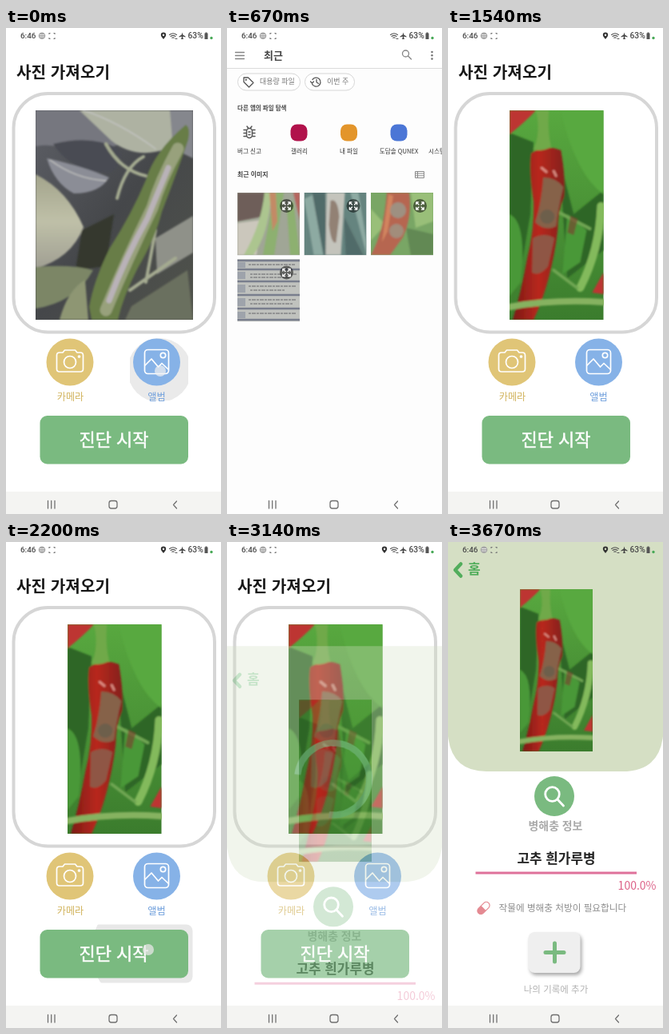
An HTML page for the animation above (3740 ms loop, 269 px wide and 608 px high).

```html
<!DOCTYPE html>
<html lang="ko">
<head>
<meta charset="utf-8">
<title>사진 가져오기</title>
<style>
html, body { margin: 0; width: 100%; height: 100%; overflow: hidden; background: #fff; }
svg { display: block; }
#stage { position: absolute; left: 0; top: 0; width: 269px; height: 608px; }
text { font-family: "Noto Sans CJK KR", "Noto Sans CJK", sans-serif; }
.ui { font-family: Roboto, sans-serif; font-weight: 500; }
.line { fill: none; stroke-linecap: round; stroke-linejoin: round; }
.mid { text-anchor: middle; }
.bold { font-weight: 700; }
.small { font-size: 7.6px; fill: #333; }

/* one loop = 3740 ms, so 1% = 37.4 ms */
.anim { animation: 3740ms linear infinite both; }
.cut { animation-timing-function: step-end; }
.spot { animation-name: spot; transform-box: fill-box; transform-origin: center; }
.tap1 { animation-name: tap1; }
.tap2 { animation-name: tap2; }
.tap3 { animation-name: tap3; }
.press { animation-name: press; transform-box: fill-box; transform-origin: center; }
.before { animation-name: before; }
.after { animation-name: after; }
.pin { animation-name: pin; }
.picker { animation-name: picker; }
.thumb { animation-name: thumb; }
.holder { animation-name: holder; }
.wait { animation-name: wait; }
.arc { animation-name: arc; transform-origin: 133px 296.5px; }
.result { animation-name: slide, reveal; animation-timing-function: cubic-bezier(.4, 0, .2, 1), linear; }

@keyframes spot { 0%, 2% { opacity: 1; transform: none; } 6.5%, 100% { opacity: 0; transform: scale(1.2); } }
@keyframes tap1 { 0%, 1.8% { opacity: .7; } 4%, 100% { opacity: 0; } }
@keyframes tap2 { 0% { opacity: 0; } 30.48% { opacity: .5; } 35.8%, 100% { opacity: 0; } }
@keyframes tap3 { 0% { opacity: 0; } 58.8% { opacity: .75; } 62.5%, 100% { opacity: 0; } }
@keyframes press {
  0%, 58.7% { opacity: 0; transform: none; }
  58.8% { opacity: 1; transform: none; }
  62.5% { opacity: 1; transform: scale(1.9); }
  66%, 100% { opacity: 0; transform: scale(2); }
}
@keyframes before { 0% { opacity: 1; } 37.4%, 100% { opacity: 0; } }
@keyframes after { 0% { opacity: 0; } 37.4%, 100% { opacity: 1; } }
@keyframes pin { 0% { opacity: 1; } 17.8% { opacity: 0; } 41%, 100% { opacity: 1; } }
@keyframes picker {
  0%, 5.3% { opacity: 0; transform: translateY(24px); }
  9.2%, 37.4% { opacity: 1; transform: none; }
  41.2%, 100% { opacity: 0; transform: none; }
}
@keyframes thumb { 0%, 9.1% { opacity: 0; } 10.7% { opacity: .13; } 20%, 100% { opacity: 1; } }
@keyframes holder { 0%, 11% { opacity: 1; } 17%, 100% { opacity: 0; } }
@keyframes wait { 0% { opacity: 0; } 62.5% { opacity: .88; } 88%, 100% { opacity: 0; } }
@keyframes arc {
  0%, 62.5% { stroke-dasharray: 2 100; transform: rotate(-90deg); animation-timing-function: cubic-bezier(.4, 0, .2, 1); }
  78.3% { stroke-dasharray: 96 100; transform: rotate(70deg); }
  88%, 100% { stroke-dasharray: 60 100; transform: rotate(270deg); }
}
@keyframes slide { 0%, 82.5% { transform: translateY(152px); } 91.2%, 100% { transform: none; } }
@keyframes reveal { 0%, 82.5% { opacity: 0; } 87%, 100% { opacity: 1; } }
</style>
</head>
<body>
<svg id="stage" viewBox="0 0 269 608" xmlns="http://www.w3.org/2000/svg">
<defs>
  <clipPath id="albumClip"><rect x="155" y="388" width="73" height="78"/></clipPath>
  <clipPath id="pressClip"><rect x="37" y="478.500" width="196.500" height="73" rx="8"/></clipPath>
  <filter id="soft" x="0" y="0" width="1" height="1"><feGaussianBlur stdDeviation="1.200"/></filter>
  <linearGradient id="shade" x2="1" y2="1"><stop stop-color="#5d5f66"/><stop offset=".5" stop-color="#45474a"/><stop offset="1" stop-color="#50534b"/></linearGradient>
  <linearGradient id="pale" x2="0" y2="1"><stop stop-color="#a3a48c"/><stop offset=".5" stop-color="#bfc0a8"/><stop offset="1" stop-color="#a09f93"/></linearGradient>
  <linearGradient id="leaf" x2="0" y2="1"><stop stop-color="#58a83f"/><stop offset="1" stop-color="#3b7c2d"/></linearGradient>
  <linearGradient id="red"><stop stop-color="#7c1814"/><stop offset=".5" stop-color="#b8291f"/><stop offset="1" stop-color="#84201a"/></linearGradient>

  <symbol id="greenChili" viewBox="0 0 197 262" preserveAspectRatio="none">
    <path fill="url(#shade)" d="M0 0H197V262H0Z"/>
    <g filter="url(#soft)">
      <path fill="#76777f" d="M0 0H75Q95 20 108 42L60 55Q25 40 0 45Z"/>
      <path fill="#aeb2a2" d="M55 0H170Q178 25 165 48Q125 62 95 38Z"/>
      <path fill="#85878d" d="M168 0H197V60L172 48Z"/>
      <path fill="#4a4c53" d="M22 42Q70 30 104 48Q112 70 92 78Q45 78 22 42Z"/>
      <path fill="#8b8d96" d="M14 60Q60 70 92 84Q80 104 48 104Q24 92 14 60Z"/>
      <path fill="url(#pale)" d="M0 80Q40 100 60 146Q45 185 0 198Z"/>
      <path fill="#35382f" d="M58 150L98 130L88 195L50 200Z"/>
      <path fill="#7b8666" d="M0 196Q45 192 72 200Q50 240 0 248Z"/>
      <path fill="#8e9673" d="M30 262Q40 225 62 212L66 262Z"/>
      <path fill="#8f9189" d="M150 160L197 132V178L152 205Z"/>
      <path fill="#6a6f5e" d="M120 245L190 200L197 262H112Z"/>
      <path class="line" stroke="#a5ab91" stroke-width="4" d="M102 110Q112 70 135 58M88 42Q106 75 138 82M118 225L175 185M150 150L138 215"/>
      <path class="line" stroke="#c2c3c0" stroke-width="1.500" d="M60 0Q105 15 150 48M18 62Q50 86 88 88"/>
      <path fill="#687d47" d="M188 18Q148 52 138 87Q120 130 93 172Q73 212 67 246L70 262H103Q110 232 128 197Q150 160 158 127Q178 75 191 37Q194 22 188 18Z"/>
      <path class="line" stroke="#98a17c" stroke-width="15" d="M178 48Q156 88 146 122Q115 185 88 250"/>
      <path class="line" stroke="#b9b2b8" stroke-width="7" d="M166 72Q150 110 140 135Q112 185 92 238"/>
    </g>
  </symbol>

  <symbol id="redChili" viewBox="0 0 117 262" preserveAspectRatio="none">
    <path fill="url(#leaf)" d="M0 0H117V262H0Z"/>
    <g filter="url(#soft)">
      <path fill="#2f6626" d="M0 28L30 40L26 130L14 200H0ZM62 60L80 130L117 100V175L72 210Z"/>
      <path fill="#58a941" d="M64 0H117V105Q82 80 64 0Z"/>
      <path fill="#499839" d="M0 130Q22 140 14 215L0 232ZM72 130L96 150L88 190L66 205Z"/>
      <path fill="#bd3531" d="M0 0H33Q20 14 0 30ZM117 203L103 228L117 230Z"/>
      <path class="line" stroke="#83ba5c" stroke-width="10" d="M114 120Q112 175 88 222"/>
      <path class="line" stroke="#70a652" stroke-width="4" d="M62 128L100 148M55 200L84 222"/>
      <path fill="url(#red)" d="M27 54Q44 42 64 50Q70 85 68 108Q60 125 60 150Q52 215 30 262H4Q15 225 22 185Q31 150 30 115Q24 75 27 54Z"/>
      <path fill="#6fa948" d="M33 0H49Q47 26 52 46Q40 52 30 49Q39 28 33 0Z"/>
      <path fill="#86624a" d="M42 84Q58 84 67 96Q60 125 58 145Q44 152 32 140Q40 115 42 84Z"/>
      <path fill="#8f5645" d="M29 160Q44 152 56 160L48 195Q38 208 28 203Z"/>
      <circle cx="47" cy="133" r="9" fill="#6d5f4c"/>
      <path class="line" stroke="#eeb3a8" stroke-width="3" d="M40 72L46 77M55 76L58 82" opacity=".7"/>
      <path class="line" stroke="#86b261" stroke-width="8" d="M0 246Q55 236 117 240"/>
      <path fill="#7c3a2c" d="M76 132l9 4-5 20-8-3z" opacity=".6"/>
    </g>
  </symbol>

  <g id="expand">
    <circle r="8.500" fill="#000" fill-opacity=".5"/>
    <path class="line" stroke="#fff" stroke-width="1.300" d="M-1.500-1.500L-4.500-4.500M-4.700-2V-4.700H-2M1.500-1.500L4.500-4.500M4.700-2V-4.700H2M-1.500 1.500L-4.500 4.500M-4.700 2V4.700H-2M1.500 1.500L4.500 4.500M4.700 2V4.700H2"/>
  </g>
  <g id="holder">
    <rect x="-10" y="-10" width="20" height="20" rx="2.500" fill="#d3484e"/>
    <path fill="#fff" d="M-7 6L-3 0L0 3.500L3.500-1.500L8 6Z"/>
  </g>
</defs>

<!-- import screen -->
<rect width="269" height="608" fill="#fff"/>
<text class="bold" x="13" y="62.700" font-size="20.200" fill="#181818">사진 가져오기</text>
<rect x="9.500" y="82" width="251.500" height="298.500" rx="43" fill="#fff" stroke="#d6d6d6" stroke-width="4"/>
<use class="anim cut before" href="#greenChili" x="37" y="103" width="197" height="262"/>
<use class="anim cut after" href="#redChili" x="77" y="103" width="117.500" height="262"/>
<g clip-path="url(#albumClip)"><circle class="anim spot" cx="192" cy="428" r="40" fill="#eaeaea"/></g>
<circle cx="80" cy="418" r="29.500" fill="#e0c577"/>
<circle cx="188.500" cy="418" r="29.500" fill="#86b2e7"/>
<g class="line" stroke="#fff" stroke-width="1.700">
  <path d="M67 406H71L73.500 403H86.500L89 406H93Q96.500 406 96.500 409.500V426.500Q96.500 430 93 430H67Q63.500 430 63.500 426.500V409.500Q63.500 406 67 406Z"/>
  <circle cx="80" cy="418" r="7.500"/><circle cx="91.500" cy="411" r="1"/>
  <rect x="173.500" y="402.500" width="30" height="30" rx="4"/>
  <circle cx="196.500" cy="409.500" r="3.200"/>
  <path d="M174 422L182 414L190.500 424L195 419.500L203 427"/>
</g>
<g class="mid" font-size="12.200">
  <text x="80.500" y="465.500" fill="#d2b45e">카메라</text>
  <text x="188.500" y="465.500" fill="#6f9fdc">앨범</text>
</g>
<circle class="anim tap1" cx="193" cy="429" r="7" fill="#f2f2f2"/>
<g clip-path="url(#pressClip)"><circle class="anim press" cx="175" cy="512" r="68" fill="#e8e8e8"/></g>
<rect x="42.500" y="485" width="185.500" height="60.500" rx="9" fill="#7aba80"/>
<text class="mid" x="135" y="523" font-size="22" fill="#fff" stroke="#fff" stroke-width=".5">진단 시작</text>
<circle class="anim cut tap3" cx="178" cy="510" r="7" fill="#e6e6e6"/>
<g class="anim cut wait">
  <circle class="anim arc" cx="133" cy="296.500" r="45" fill="none" stroke="#74b982" stroke-width="8" pathLength="100"/>
</g>

<!-- diagnosis screen -->
<g class="anim result">
  <rect y="-4" width="269" height="620" fill="#fff"/>
  <path fill="#d5dfc4" d="M0-8H269V243Q264 287 218 287H48Q5 287 0 243Z"/>
  <path class="line" stroke="#52ad5c" stroke-width="4.500" d="M16 27.500L9 35L16 42.500"/>
  <text class="bold" x="25" y="40" font-size="17" fill="#52ad5c">홈</text>
  <use href="#redChili" x="90" y="59" width="91" height="203"/>
  <circle cx="133" cy="318" r="25" fill="#7aba80"/>
  <g class="line" stroke="#fff" stroke-width="2.800"><circle cx="130.500" cy="315.500" r="8.800"/><path d="M137 322L144.500 330"/></g>
  <g class="mid">
    <text class="bold" x="134.500" y="359.500" font-size="13.900" fill="#a9a9a9">병해충 정보</text>
    <text class="bold" x="135.500" y="402" font-size="16.900" fill="#222">고추 흰가루병</text>
    <text x="135" y="563.500" font-size="11.500" fill="#b2b2b2">나의 기록에 추가</text>
  </g>
  <path stroke="#df719a" stroke-width="3" d="M34.500 414H236"/>
  <text x="260.500" y="435" font-size="14" text-anchor="end" fill="#dc6087">100.0%</text>
  <g transform="translate(44.500 458) rotate(-45)">
    <rect x="-9" y="-4.200" width="18" height="8.400" rx="4.200" fill="#fff" stroke="#e48a92" stroke-width="1.200"/>
    <path fill="#e48a92" d="M0-4.200H-5A4.200 4.200 0 0 0-5 4.200H0Z"/>
  </g>
  <text x="63.500" y="462.300" font-size="11.650" fill="#8e8e8e">작물에 병해충 처방이 필요합니다</text>
  <rect x="100.500" y="488" width="65" height="51" rx="8" fill="#efefef" style="filter:drop-shadow(2px 3px 2px #aaa)"/>
  <path class="line" stroke="#7aba80" stroke-width="5" d="M122 513.500H145M133.500 502V525"/>
</g>
<rect y="580" width="269" height="28" fill="#f4f4f2"/>

<!-- file picker -->
<g class="anim picker">
  <rect y="-30" width="269" height="668" fill="#fdfdfd"/>
  <rect width="269" height="50" fill="#fff"/>
  <path stroke="#dcdcdc" d="M0 50.500H269"/>
  <g class="line" stroke="#858585" stroke-width="1.300">
    <path d="M10.500 30.500H21.500M10.500 34.500H21.500M10.500 38.500H21.500"/>
    <circle cx="223.500" cy="32" r="4"/><path d="M226.500 35L230.500 39"/>
  </g>
  <g fill="#777"><circle cx="256.500" cy="30" r="1.300"/><circle cx="256.500" cy="34.300" r="1.300"/><circle cx="256.500" cy="38.600" r="1.300"/></g>
  <text class="bold" x="46" y="38.700" font-size="13" fill="#444">최근</text>
  <g fill="#fff" stroke="#d6d6d6"><rect x="13.500" y="57" width="78" height="21" rx="10.500"/><rect x="97.500" y="57" width="62" height="21" rx="10.500"/></g>
  <g class="line" stroke="#555" stroke-width="1.300">
    <path d="M21 62H26.500L33 68.500L27.500 74L21 67.500Z"/><circle cx="23.800" cy="64.800" r=".5"/>
    <path d="M106.500 70A5.500 5.500 0 1 0 107 64.500M104.500 67L106.500 69L108.500 67M112 64.500V67.800L114.500 69.500"/>
  </g>
  <g font-size="8.950" fill="#777"><text x="41" y="70.300">대용량 파일</text><text x="125" y="70.300">이번 주</text></g>
  <g class="bold" fill="#444"><text x="13" y="102.500" font-size="7.500">다른 앱의 파일 탐색</text><text x="13" y="186" font-size="7.900">최근 이미지</text></g>
  <g class="line" stroke="#555" stroke-width="1.500">
    <rect x="24.500" y="125.500" width="7" height="12" rx="3.500"/>
    <path d="M21 127.500H24M21 131.500H24M21 135.500H24M32 127.500H35M32 131.500H35M32 135.500H35M25 123L26.500 125M31 123L29.500 125M27 130H29M27 133.500H29"/>
  </g>
  <rect x="79.500" y="120.500" width="21" height="21" rx="8" fill="#b1124b"/>
  <rect x="142" y="120.500" width="21" height="21" rx="8" fill="#e3952b"/>
  <rect x="204.500" y="120.500" width="21" height="21" rx="8" fill="#4b76d6"/>
  <g class="small mid">
    <text x="28" y="156.500">버그 신고</text><text x="90.500" y="156.500">갤러리</text><text x="152.500" y="156.500">내 파일</text>
    <text x="215" y="156.500">도담솔 QUNEX</text>
  </g>
  <text class="small" x="252" y="156.500">시스템</text>
  <path fill="none" stroke="#8c8c8c" d="M235.500 179.500H246.500V187.500H235.500ZM235.500 182H246.500M235.500 184.800H246.500M238.500 179.500V187.500"/>
  <path fill="#ececec" d="M13 206h78v79H13zM96.500 206h78v79h-78zM180 206h78v79h-78zM13 289.500h78v78H13z"/>

  <g class="anim thumb">
    <svg x="13" y="206" width="78" height="78" viewBox="0 0 78 78">
      <path fill="#8d9480" d="M0 0H78V78H0Z"/>
      <g filter="url(#soft)">
        <path fill="#4f3a36" d="M0 0H40L30 30L0 36Z"/><path fill="#c3bdb0" d="M0 38L30 34L24 78H0Z"/>
        <path fill="#74a151" d="M46 0H58L46 78H32ZM62 20L70 10L78 78H66Z"/><path fill="#9cbb78" d="M8 78Q30 40 34 0H42Q40 50 20 78Z"/>
        <path fill="#b87245" d="M40 0H48L50 36L44 48Z"/><path fill="#a8433a" d="M70 0H78V34Z"/>
      </g>
    </svg>
    <svg x="96.500" y="206" width="78" height="78" viewBox="0 0 78 78">
      <path fill="#446a64" d="M0 0H78V78H0Z"/>
      <g filter="url(#soft)">
        <path fill="#76998f" d="M0 8L16 0L26 78H12ZM58 0H68L78 60V78Z"/><path fill="#2c4b48" d="M10 0H26L30 78H24ZM50 30L74 78H52Z"/>
        <path fill="#babab0" d="M28 0H51L46 78H27Z"/><path fill="#7b6656" d="M33 10Q42 6 44 30L40 62Q34 66 31 40Z"/>
      </g>
    </svg>
    <svg x="180" y="206" width="78" height="78" viewBox="0 0 78 78">
      <path fill="#5c9444" d="M0 0H78V78H0Z"/>
      <g filter="url(#soft)">
        <path fill="#84b45c" d="M50 0H78V36L56 44ZM0 20L18 40L0 60Z"/><path fill="#40702f" d="M44 44L78 52V78H50Z"/>
        <path fill="#a8452a" d="M20 0H48Q52 30 40 56L24 78H0Q16 50 20 0Z"/><path fill="#cb6b3a" d="M22 2L28 4L21 48L14 62Z"/>
        <circle cx="34" cy="22" r="10" fill="#8a7966"/><circle cx="32" cy="48" r="9" fill="#8f745f"/>
      </g>
    </svg>
    <svg x="13" y="289" width="78" height="78" viewBox="0 0 78 78">
      <path fill="#b5b7b2" d="M0 0H78V78H0Z"/>
      <path stroke="#5c6375" stroke-width="2.500" d="M0 2H78M0 13H78M0 28H78M0 45H78M0 62H78M0 76H78"/>
      <path stroke="#6b6c6d" stroke-width="1.300" stroke-dasharray="3 1 5 1" d="M14 7H72M16 19H74M16 23H66M14 34H74M16 39H60M14 51H74M16 56H70M14 68H74"/>
      <path fill="#8b919b" d="M0 4H10V11H0ZM0 16H10V25H0ZM0 32H10V42H0ZM0 49H10V59H0ZM0 66H10V74H0Z"/>
    </svg>
  </g>
  <g class="anim holder">
    <use href="#holder" x="52" y="245"/><use href="#holder" x="135.500" y="245"/><use href="#holder" x="219" y="245"/><use href="#holder" x="52" y="328"/>
  </g>
  <use href="#expand" x="74.500" y="222.500"/><use href="#expand" x="158" y="222.500"/><use href="#expand" x="241.500" y="222.500"/><use href="#expand" x="74.500" y="306"/>
  <circle class="anim cut tap2" cx="234" cy="263.500" r="7" fill="#dcdcdc"/>
</g>

<!-- system bars -->
<g fill="#4a4a4a"><text class="ui" x="18" y="13.300" font-size="9.900">6:46</text><text class="ui" x="227.500" y="13.300" font-size="10.300">63%</text></g>
<circle cx="45" cy="9.800" r="4.300" fill="#a5a5a5"/><path stroke="#e5e5e5" d="M42 8.500H48M42 11H48"/>
<path fill="none" stroke="#777" stroke-width="1.100" d="M54 8V6.500H55.500M59.500 6.500H61V8M61 12V13.500H59.500M55.500 13.500H54V12"/>
<path class="anim cut pin" fill="#333" fill-rule="evenodd" d="M197 14Q193.800 10.500 193.800 8.800A3.200 3.200 0 0 1 200.200 8.800Q200.200 10.500 197 14ZM197 7.600A1.200 1.200 0 1 0 197 10A1.200 1.200 0 1 0 197 7.600Z"/>
<g class="line" stroke="#555" stroke-width="1.100"><path d="M204.500 8.500Q209 5 213.500 8.500M206 10.500Q209 8.200 212 10.500M207.800 12.300Q209 11.500 210.200 12.300M212 13.500L214 13.500"/></g>
<path fill="#444" d="M220.500 5.500L221.300 8.500L224.500 10.500V11.500L221.300 10.600V12.800L222.300 14H218.700L219.700 12.800V10.600L216.500 11.500V10.500L219.700 8.500Z"/>
<path fill="#555" d="M248.500 6.500H249.500V5.500H251.500V6.500H252.500V14H248.500Z"/>
<circle cx="257" cy="12.500" r="1.700" fill="#48a957"/>
<g class="line" stroke="#707070" stroke-width="1.300">
  <path d="M52.500 591.500V601M56.700 591.500V601M61 591.500V601M213.500 592L209.500 596.500L213.500 601"/>
  <rect x="129" y="591.500" width="10" height="9.500" rx="2.800"/>
</g>
</svg>
</body>
</html>
```
